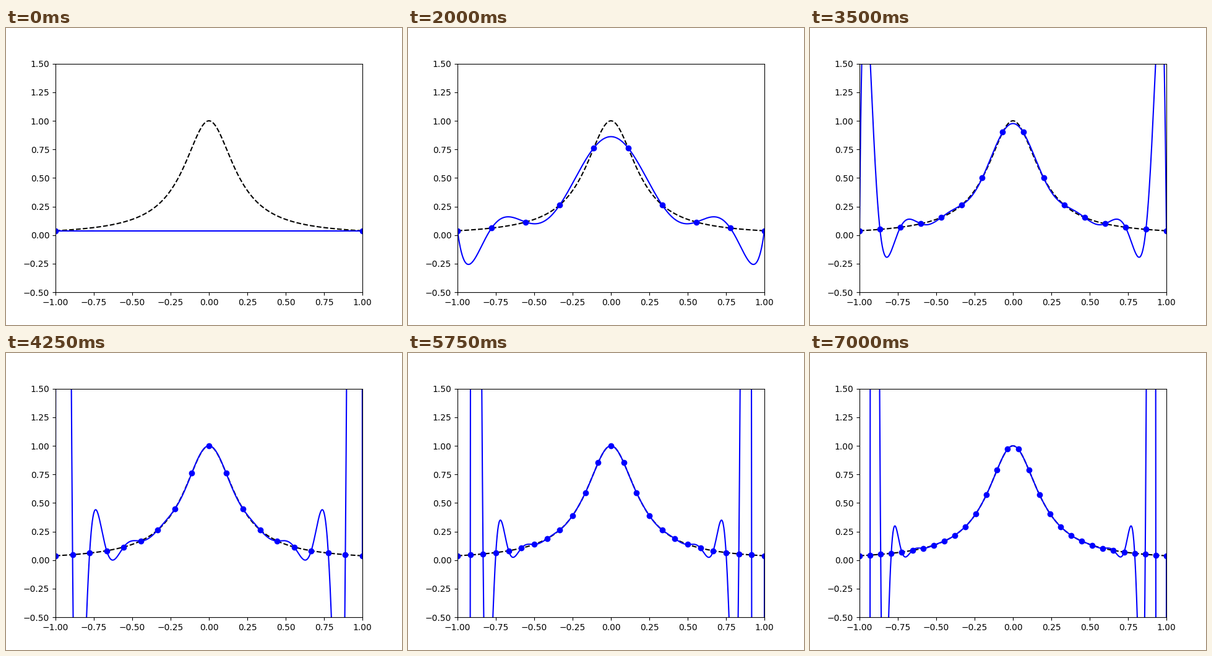
A matplotlib script that plays this animation: 640x480 px, repeating every 7.25 s.

```python
import matplotlib.pyplot as plt
import numpy as np
from matplotlib.animation import FuncAnimation

FRAMES = 29
INTERVAL = 250


def runge(x):
    return 1 / (1 + 25 * x**2)


def interpolate(nodes, values, x):
    """Lagrange polynomial through the nodes, evaluated at x."""
    total = np.zeros_like(x)
    for i, (node, value) in enumerate(zip(nodes, values)):
        others = np.delete(nodes, i)
        basis = np.prod((x[:, None] - others) / (node - others), axis=1)
        total += value * basis
    return total


fig, ax = plt.subplots(figsize=(6.4, 4.8), dpi=100)
ax.set_xlim(-1, 1)
ax.set_ylim(-0.5, 1.5)

x = np.linspace(-1, 1, 1000)
ax.plot(x, runge(x), "k--")
curve, = ax.plot([], [], "b-")
dots, = ax.plot([], [], "bo")


def update(frame):
    nodes = np.linspace(-1, 1, frame + 2)
    values = runge(nodes)
    curve.set_data(x, interpolate(nodes, values, x))
    dots.set_data(nodes, values)
    return curve, dots


def init():
    return update(0)


anim = FuncAnimation(fig, update, frames=FRAMES, init_func=init,
                     interval=INTERVAL, repeat=True, repeat_delay=0)
plt.show()
```
